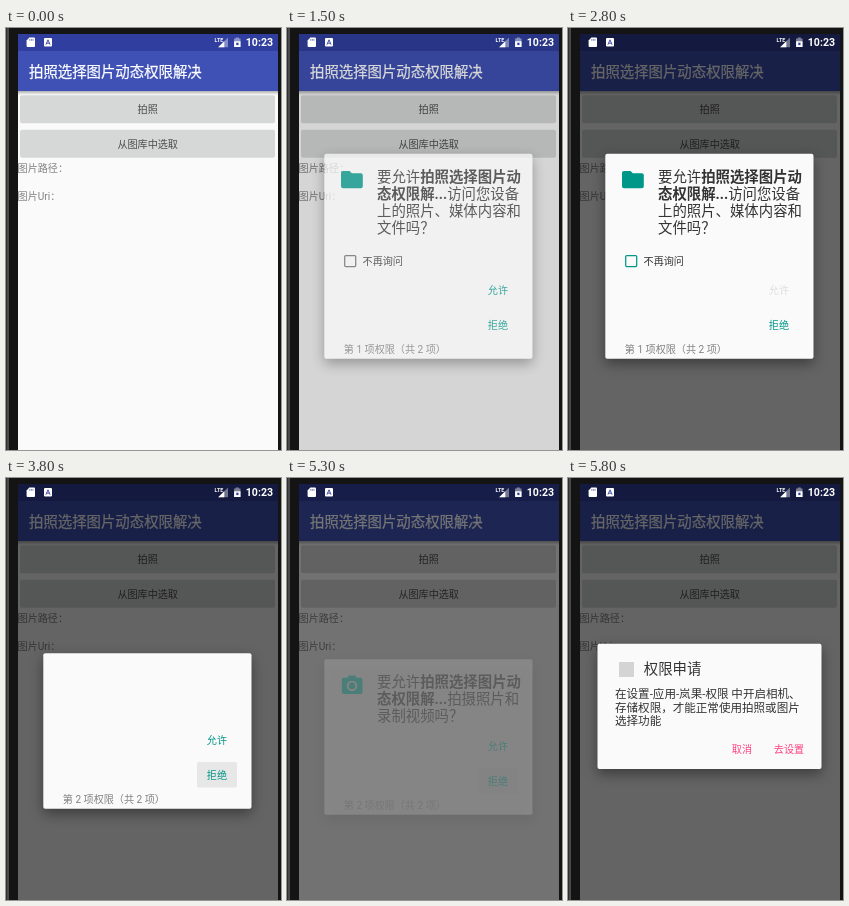
An HTML page that plays this animation: 275 by 422 pixels, repeating every 8 s.

```html
<!DOCTYPE html>
<html lang="zh-CN">
<head>
<meta charset="utf-8">
<title>动态权限</title>
<style>
html, body { margin: 0; width: 100%; height: 100%; overflow: hidden; background: #141414; }
svg { display: block; width: 100vw; height: 100vh; }
text { font: 10.1px Roboto, "Noto Sans CJK SC", "Noto Sans CJK", sans-serif; white-space: pre; }
.big { font-size: 14.4px; }
.body { font-size: 11.55px; }
.bold { font-weight: 700; }
.dark { fill: #333; }
.mid { fill: #4a4a4a; }
.grey { fill: #808080; }
.teal { fill: #009688; }
.pink { fill: #ff4081; }
.card { fill: #fafafa; filter: drop-shadow(0 5px 6.5px rgba(0, 0, 0, .4)); }

/* 100 ms of the 8 s loop is 1.25 % */
.dim, .press, .ask, .panel, .first, .second, .one, .two, .allow, .outline,
.halo, .fill, .tick, .held, .setup { animation: 8s step-end infinite; }

.press { animation-name: press; }
@keyframes press { 0%, 13.75%, 100% { opacity: 0 } 12.5% { opacity: .07 } }

.dim { animation-name: dim; }
@keyframes dim {
  0%, 100% { opacity: 0 }
  18.75% { opacity: .15 } 20% { opacity: .42 } 21.25% { opacity: .6 }
  66.25% { opacity: .54 } 67.5% { opacity: .22 } 68.75% { opacity: 0 }
  70% { opacity: .15 } 71.25% { opacity: .42 } 72.5% { opacity: .6 }
}

.ask { animation-name: ask; }
@keyframes ask {
  0%, 100% { opacity: 0; transform: none }
  18.75% { opacity: .75 } 20% { opacity: .95 } 21.25% { opacity: 1; transform: none }
  65% { opacity: .8; transform: translateY(2px) }
  66.25% { opacity: .34; transform: translateY(6px) }
  67.5% { opacity: .06; transform: translateY(9px) }
  68.75% { opacity: 0; transform: none }
}

.panel { animation-name: panel; }
@keyframes panel {
  0%, 100% { y: 125.8px; height: 205px; fill-opacity: 1 }
  46.25% { y: 150px; height: 180.8px }
  47.5% { y: 175.2px; height: 155.6px; fill-opacity: 1 }
  66.25% { y: 175.2px; height: 155.6px; fill-opacity: .5 }
}

.first { animation-name: first; }
@keyframes first { 0%, 100% { opacity: 1 } 45% { opacity: .6 } 46.25% { opacity: 0 } }

.second { animation-name: second; }
@keyframes second {
  0%, 100% { opacity: 0 }
  52.5% { opacity: .25 } 53.75% { opacity: .55 } 55% { opacity: .85 } 56.25% { opacity: 1 }
}

.one { animation-name: one; }
@keyframes one { 0%, 100% { opacity: 1 } 46.25% { opacity: 0 } }
.two { animation-name: two; }
@keyframes two { 0%, 100% { opacity: 0 } 46.25% { opacity: 1 } }

.allow { animation-name: allow; }
@keyframes allow { 0%, 46.25%, 100% { fill: #009688 } 35% { fill: #dedede } }

.outline { animation-name: outline; }
@keyframes outline { 0%, 100% { stroke: #6b6b6b } 35% { stroke: #009688 } }

.halo { animation-name: halo; }
@keyframes halo {
  0%, 41.25%, 100% { opacity: 0 }
  36.25% { opacity: .1 } 37.5% { opacity: .12 } 38.75% { opacity: .08 } 40% { opacity: .04 }
}

.fill { animation-name: fill; transform-origin: 63.2px 233px; }
@keyframes fill { 0%, 100% { transform: scale(0) } 36.25% { transform: scale(.6) } 37.5% { transform: none } }

.tick { animation-name: tick; }
@keyframes tick { 0%, 100% { opacity: 0 } 38.75% { opacity: .6 } 40% { opacity: 1 } }

.held { animation-name: held; }
@keyframes held { 0%, 100% { opacity: 0 } 45% { opacity: .05 } 46.25% { opacity: .075 } 66.25% { opacity: .03 } }

.setup { animation-name: setup; }
@keyframes setup { 0%, 100% { opacity: 0 } 70% { opacity: .75 } 71.25% { opacity: .95 } 72.5% { opacity: 1 } }
</style>
</head>
<body>
<svg viewBox="0 0 275 422" preserveAspectRatio="none">
  <defs>
    <linearGradient id="shade" x2="0" y2="1">
      <stop stop-opacity=".3"/><stop offset="1" stop-opacity="0"/>
    </linearGradient>
    <clipPath id="button"><rect x="14" y="67" width="255" height="28" rx="2"/></clipPath>
  </defs>

  <!-- device -->
  <rect width="275" height="422" fill="#141414"/>
  <rect x=".5" width="2.5" height="422" fill="#4a4a4a"/>

  <!-- app -->
  <rect x="12" y="6" width="260" height="416" fill="#fafafa"/>
  <rect x="12" y="63" width="260" height="4" fill="url(#shade)"/>
  <rect x="12" y="6" width="260" height="17" fill="#303f9f"/>
  <rect x="12" y="23" width="260" height="40" fill="#3f51b5"/>
  <text class="big" x="23" y="48.6" fill="#fff" stroke="#fff" stroke-width=".25">拍照选择图片动态权限解决</text>

  <g fill="#d6d7d7">
    <rect x="14" y="67.2" width="255" height="28" rx="2"/>
    <rect x="14" y="101.8" width="255" height="28" rx="2"/>
  </g>
  <g clip-path="url(#button)"><circle class="press" cx="127" cy="81" r="55"/></g>
  <g class="mid" text-anchor="middle">
    <text x="141.7" y="84.8">拍照</text>
    <text x="141.7" y="119.6">从图库中选取</text>
  </g>
  <g class="grey">
    <text x="11.6" y="144">图片路径：</text>
    <text x="11.6" y="171.6">图片Uri：</text>
  </g>

  <rect class="dim" x="12" y="6" width="260" height="416"/>

  <!-- status icons stay above the dimming -->
  <g fill="#fff">
    <path d="M23.3 9.6H28a1 1 0 0 1 1 1V18a1 1 0 0 1-1 1h-6.4a1 1 0 0 1-1-1v-5.6Z"/>
    <path d="M23.8 11v1.8M25.4 11v1.8M27 11v1.8" stroke="#303f9f" stroke-width=".6"/>
    <rect x="38" y="10" width="8" height="8.5" rx="1"/>
    <path d="M39.9 16.7 42 11.8l2.1 4.9M40.7 15.2h2.6" fill="none" stroke="#303f9f" stroke-width=".9"/>
    <path d="M222 9.5v9.8h-9.8Z" opacity=".4"/>
    <path d="M218.3 13.2v6.1h-6.1Z"/>
    <text x="208.6" y="13.8" style="font-size:5.4px;font-weight:700">LTE</text>
    <path d="M229.8 9.5h3v1h1.7V19h-6.4v-8.5h1.7Z" opacity=".45"/>
    <path d="M228.1 13.3h6.4V19h-6.4Z"/>
    <rect x="230.3" y="14.7" width="2.2" height="2.4" fill="#303f9f"/>
    <text x="239.8" y="18" style="font-size:10.6px;font-weight:700">10:23</text>
  </g>

  <!-- permission request -->
  <g class="ask">
    <rect class="panel card" x="37.3" y="125.8" width="208.2" height="205" rx="2"/>

    <g class="first">
      <path class="teal" d="M56 143h6.6l2.2 2.2h9a2 2 0 0 1 2 2V158.3a2 2 0 0 1-2 2H56a2 2 0 0 1-2-2V145a2 2 0 0 1 2-2Z"/>
      <g class="dark">
        <text class="big" x="90" y="154.4">要允许<tspan class="bold">拍照选择图片动</tspan></text>
        <text class="big" x="90" y="171.4"><tspan class="bold">态权限解...</tspan>访问您设备</text>
        <text class="big" x="90" y="188.4">上的照片、媒体内容和</text>
        <text class="big" x="90" y="205.4">文件吗？</text>
        <text x="75.6" y="236.8">不再询问</text>
      </g>
      <circle class="halo teal" cx="63.2" cy="233" r="12"/>
      <rect class="outline" x="57.7" y="227.5" width="11" height="11" rx="1" fill="none" stroke-width="1.25"/>
      <rect class="fill teal" x="57" y="226.8" width="12.4" height="12.4" rx="1.2"/>
      <path class="tick" d="m59.3 233 2.7 2.7 5-5.2" fill="none" stroke="#fafafa" stroke-width="1.4"/>
    </g>

    <g class="second">
      <path class="teal" fill-rule="evenodd" d="M62 191.5h6l1.9 2.2h3.6a2 2 0 0 1 2 2V208a2 2 0 0 1-2 2H56.8a2 2 0 0 1-2-2v-12.3a2 2 0 0 1 2-2h3.4ZM65 196.7a5.2 5.2 0 1 0 .01 0Z"/>
      <circle class="teal" cx="65" cy="201.9" r="3.3"/>
      <g class="dark">
        <text class="big" x="90" y="203.4">要允许<tspan class="bold">拍照选择图片动</tspan></text>
        <text class="big" x="90" y="220.4"><tspan class="bold">态权限解...</tspan>拍摄照片和</text>
        <text class="big" x="90" y="237.4">录制视频吗？</text>
      </g>
    </g>

    <rect class="held" x="191" y="284" width="40" height="25.5" rx="1.5"/>
    <text class="allow" x="200.8" y="266">允许</text>
    <text class="teal" x="200.8" y="300.8">拒绝</text>
    <g class="grey">
      <text class="one" x="56.8" y="325">第 1 项权限（共 2 项）</text>
      <text class="two" x="56.8" y="325">第 2 项权限（共 2 项）</text>
    </g>
  </g>

  <!-- settings hint -->
  <g class="setup">
    <rect class="card" x="29.5" y="165.7" width="224" height="125.2" rx="2"/>
    <rect x="51" y="184" width="15" height="15" fill="#d4d4d4"/>
    <g class="dark">
      <text class="big" x="75.8" y="195.6">权限申请</text>
      <text class="body" x="47" y="220">在设置-应用-岚果-权限 中开启相机、</text>
      <text class="body" x="47" y="233.7">存储权限，才能正常使用拍照或图片</text>
      <text class="body" x="47" y="247.4">选择功能</text>
    </g>
    <g class="pink">
      <text x="163.8" y="275">取消</text>
      <text x="205.8" y="275">去设置</text>
    </g>
  </g>
</svg>
</body>
</html>
```
